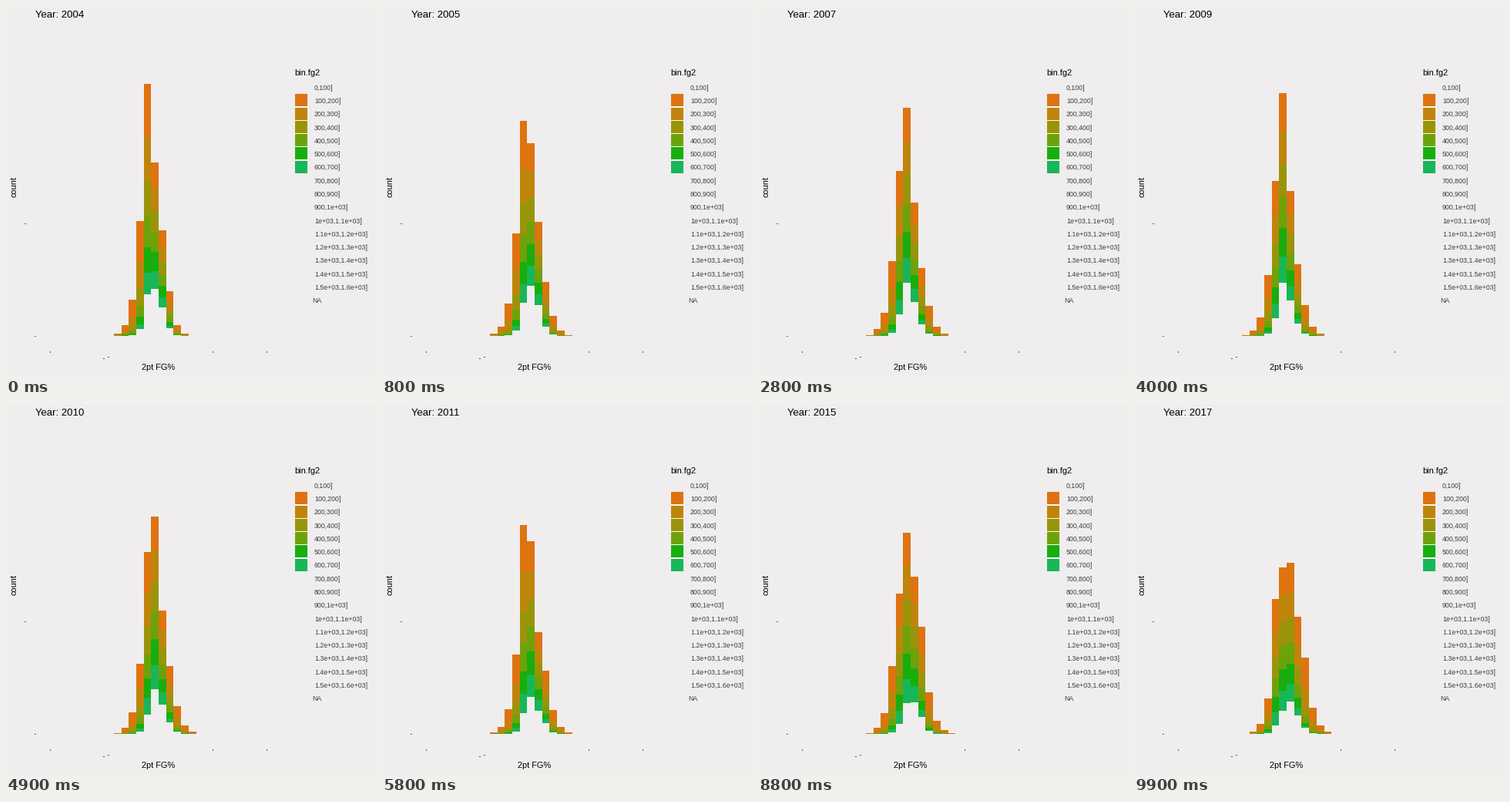
Recreate the animation shown at these times as a matplotlib script. Size 480 px wide and 480 px high, loop 10 s.

```python
import matplotlib.pyplot as plt
import numpy as np
from matplotlib.animation import FuncAnimation
from matplotlib.collections import PolyCollection
from matplotlib.patches import Rectangle

SIZE, DPI, FRAMES = 480, 80, 100
BASE, BINS = 428, 13
FIRST, LAST = 2004, 2017
BACK = "#efedee"
FILLS = ["#de7310", "#bf850a", "#9a940a", "#6ea20a", "#17ae0e", "#18b658"]

# Heights of the six middle bars at the turning points of the motion.
MID = 3
PEAKS = {
    0: (149, 327, 225, 137, 58, 14),
    17: (114, 226, 278, 160, 83, 39),
    40: (79, 201, 315, 188, 93, 40),
    58: (103, 271, 250, 132, 82, 31),
    72: (111, 238, 279, 173, 107, 32),
    88: (88, 182, 261, 204, 139, 54),
    99: (46, 175, 216, 222, 152, 99),
}
TIMES = list(PEAKS)
TRACKS = list(zip(*PEAKS.values()))

bins = np.arange(BINS)
edges_x = np.round(140 + 9.685 * np.arange(BINS + 1))

# Each class is smaller than the one above it, most of all in the tails.
fall = np.minimum(0.06 + 0.07 * (bins - 5.3) ** 2, 0.7)
share = np.exp(-np.outer(fall, np.arange(len(FILLS))))
share /= share.sum(axis=1, keepdims=True)
depth = np.hstack([np.zeros((BINS, 1)), share.cumsum(axis=1)])


def heights(f):
    """Bar heights: the middle follows its tracks, both tails die away."""
    mid = [np.interp(f, TIMES, track) for track in TRACKS]
    right = np.arange(1, BINS - MID - len(mid) + 1)
    left = np.arange(MID, 0, -1)
    return np.concatenate([
        np.maximum(mid[0] * 0.33 ** left - 2, 0),
        mid,
        np.maximum(mid[-1] * 0.36 ** right - 2, 0),
    ])


def edges_y(f):
    """Class edges of every bar; the lowest classes have no colour."""
    t = f / (FRAMES - 1)
    h = heights(f)
    center = 5.5 + 0.6 * t
    hidden = h * (0.29 - 0.1 * t) * np.exp(-((bins - center) / 2) ** 2)
    return np.round(BASE - h[:, None] + (h - hidden)[:, None] * depth)


plt.rcParams["font.family"] = "Liberation Sans"
fig = plt.figure(figsize=(SIZE / DPI, SIZE / DPI), dpi=DPI, facecolor=BACK)
ax = fig.add_axes([0, 0, 1, 1])
ax.set_xlim(0, SIZE)
ax.set_ylim(SIZE, 0)
ax.axis("off")


def label(x, y, text, px, color="black", **kw):
    kw = {"ha": "left", "va": "baseline", **kw}
    return ax.text(x, y, text, fontsize=px * 72 / DPI, color=color, **kw)


def box(x, y, w, h, color):
    ax.add_patch(Rectangle((x, y), w, h, fc=color, lw=0, antialiased=False))


def bound(n):
    """Class limit n * 100 as printed with two significant digits."""
    return str(n * 100) if n < 10 else f"{n / 10:g}e+03"


def draw_legend():
    step = 17.28
    label(374, 90, "bin.fg2", 11)
    box(375, 114, 16, 103, "#faf9f9")
    for i, color in enumerate(FILLS):
        box(375, round(114.3 + step * i), 16, 16, color)
    for n in range(16):
        text = f"{bound(n)},{bound(n + 1)}]"
        label(400, 108.7 + step * n, text, 8.8, "#404040")
    label(397, 385.2, "NA", 8.8, "#404040")


def draw_axes():
    label(197.5, 472, "2pt FG%", 11, ha="center")
    label(15.5, 235, "count", 11, ha="right", va="center", rotation=90)
    for x in (57, 268, 338):
        box(x, 448, 1, 2, "#555555")
    for x, y in [(37, 428), (24, 282), (126, 457), (132, 455)]:
        box(x, y, 2, 1, "#555555")


draw_legend()
draw_axes()
title = label(38, 15, "", 13.2)
bars = PolyCollection([], linewidths=0, antialiaseds=False,
                      facecolors=FILLS * BINS)
ax.add_collection(bars, autolim=False)


def update(f):
    title.set_text(f"Year: {FIRST + (LAST - FIRST) * f // (FRAMES - 1)}")
    polys = []
    for x0, x1, ys in zip(edges_x, edges_x[1:], edges_y(f)):
        for y0, y1 in zip(ys, ys[1:]):
            polys.append([(x0, y0), (x1, y0), (x1, y1), (x0, y1)])
    bars.set_verts(polys)
    return bars, title


anim = FuncAnimation(fig, update, frames=FRAMES, interval=100, repeat=True)
plt.show()
```
